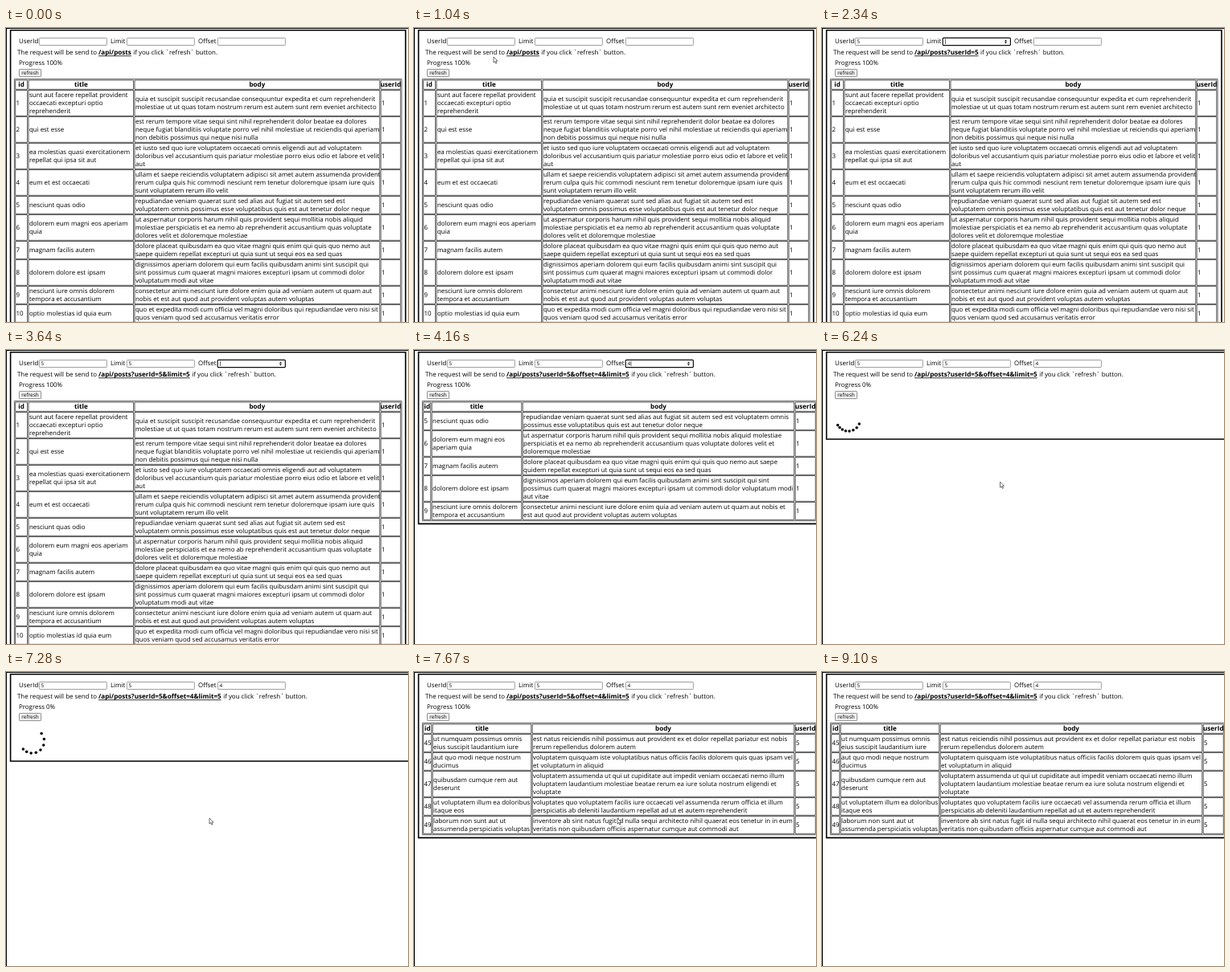
Write an HTML page with a canvas that moves like this. It is 500 px wide and 366 px high and loops after 9230 ms.

```html
<!DOCTYPE html>
<html lang="en">
<head>
<meta charset="utf-8">
<title>Post list</title>
<style>
html, body { margin: 0; width: 100%; height: 100%; overflow: hidden; background: #fff; }
canvas { display: block; }
</style>
</head>
<body>
<canvas id="stage" width="500" height="366"></canvas>
<script>
const ctx = document.getElementById('stage').getContext('2d');
ctx.textRendering = 'geometricPrecision';
const LOOP = 9230, STEP = 130, LINE = 10.2;
const FAMILY = '"Open Sans", "Noto Sans", sans-serif';
const REGULAR = `7.92px ${FAMILY}`, BOLD = `bold 8.1px ${FAMILY}`, SMALL = `6.4px ${FAMILY}`;

// Rows are "id; title; body", with | between lines.
const parse = text => text.trim().split('\n').map(row => row.split(';').map(cell => cell.split('|')));

const allPosts = { edges: [11, 27.3, 159.3, 465.5, 491.5], user: '1', right: 497, rows: parse(`
1;sunt aut facere repellat provident|occaecati excepturi optio|reprehenderit;quia et suscipit suscipit recusandae consequuntur expedita et cum reprehenderit|molestiae ut ut quas totam nostrum rerum est autem sunt rem eveniet architecto
2;qui est esse;est rerum tempore vitae sequi sint nihil reprehenderit dolor beatae ea dolores|neque fugiat blanditiis voluptate porro vel nihil molestiae ut reiciendis qui aperiam|non debitis possimus qui neque nisi nulla
3;ea molestias quasi exercitationem|repellat qui ipsa sit aut;et iusto sed quo iure voluptatem occaecati omnis eligendi aut ad voluptatem|doloribus vel accusantium quis pariatur molestiae porro eius odio et labore et velit|aut
4;eum et est occaecati;ullam et saepe reiciendis voluptatem adipisci sit amet autem assumenda provident|rerum culpa quis hic commodi nesciunt rem tenetur doloremque ipsam iure quis|sunt voluptatem rerum illo velit
5;nesciunt quas odio;repudiandae veniam quaerat sunt sed alias aut fugiat sit autem sed est|voluptatem omnis possimus esse voluptatibus quis est aut tenetur dolor neque
6;dolorem eum magni eos aperiam|quia;ut aspernatur corporis harum nihil quis provident sequi mollitia nobis aliquid|molestiae perspiciatis et ea nemo ab reprehenderit accusantium quas voluptate|dolores velit et doloremque molestiae
7;magnam facilis autem;dolore placeat quibusdam ea quo vitae magni quis enim qui quis quo nemo aut|saepe quidem repellat excepturi ut quia sunt ut sequi eos ea sed quas
8;dolorem dolore est ipsam;dignissimos aperiam dolorem qui eum facilis quibusdam animi sint suscipit qui|sint possimus cum quaerat magni maiores excepturi ipsam ut commodi dolor|voluptatum modi aut vitae
9;nesciunt iure omnis dolorem|tempora et accusantium;consectetur animi nesciunt iure dolore enim quia ad veniam autem ut quam aut|nobis et est aut quod aut provident voluptas autem voluptas
10;optio molestias id quia eum;quo et expedita modi cum officia vel magni doloribus qui repudiandae vero nisi sit|quos veniam quod sed accusamus veritatis error`) };

const slicedPosts = { edges: [11, 21.5, 134.5, 473.5, 500], user: '1', right: 506, rows: parse(`
5;nesciunt quas odio;repudiandae veniam quaerat sunt sed alias aut fugiat sit autem sed est voluptatem omnis|possimus esse voluptatibus quis est aut tenetur dolor neque
6;dolorem eum magni eos|aperiam quia;ut aspernatur corporis harum nihil quis provident sequi mollitia nobis aliquid molestiae|perspiciatis et ea nemo ab reprehenderit accusantium quas voluptate dolores velit et|doloremque molestiae
7;magnam facilis autem;dolore placeat quibusdam ea quo vitae magni quis enim qui quis quo nemo aut saepe|quidem repellat excepturi ut quia sunt ut sequi eos ea sed quas
8;dolorem dolore est ipsam;dignissimos aperiam dolorem qui eum facilis quibusdam animi sint suscipit qui sint|possimus cum quaerat magni maiores excepturi ipsam ut commodi dolor voluptatum modi|aut vitae
9;nesciunt iure omnis dolorem|tempora et accusantium;consectetur animi nesciunt iure dolore enim quia ad veniam autem ut quam aut nobis et|est aut quod aut provident voluptas autem voluptas`) };

const userPosts = { edges: [11, 22.5, 146.5, 473.5, 500], user: '5', right: 506, rows: parse(`
45;ut numquam possimus omnis|eius suscipit laudantium iure;est natus reiciendis nihil possimus aut provident ex et dolor repellat pariatur est nobis|rerum repellendus dolorem autem
46;aut quo modi neque nostrum|ducimus;voluptatem quisquam iste voluptatibus natus officiis facilis dolorem quis quas ipsam vel|et voluptatum in aliquid
47;quibusdam cumque rem aut|deserunt;voluptatem assumenda ut qui ut cupiditate aut impedit veniam occaecati nemo illum|voluptatem laudantium molestiae beatae rerum ea iure soluta nostrum eligendi et|voluptate
48;ut voluptatem illum ea doloribus|itaque eos;voluptates quo voluptatem facilis iure occaecati vel assumenda rerum officia et illum|perspiciatis ab deleniti laudantium repellat ad ut et autem reprehenderit
49;laborum non sunt aut ut|assumenda perspiciatis voluptas;inventore ab sint natus fugit id nulla sequi architecto nihil quaerat eos tenetur in in eum|veritatis non quibusdam officiis aspernatur cumque aut commodi aut`) };

function text(str, x, centerY, font = REGULAR, align = 'left') {
  ctx.font = font;
  ctx.textAlign = align;
  ctx.fillStyle = '#000';
  ctx.fillText(str, x, centerY + 2.3);
  return ctx.measureText(str).width;
}

function box(x, y, w, h, color, width, fill, radius = 0) {
  ctx.beginPath();
  ctx.roundRect(x, y, w, h, radius);
  if (fill) { ctx.fillStyle = fill; ctx.fill(); }
  ctx.strokeStyle = color;
  ctx.lineWidth = width;
  ctx.stroke();
}

function drawTable({ edges, user, rows }) {
  const cell = (i, y, h) =>
    box(edges[i] + .7, y + .5, edges[i + 1] - edges[i] - 1.4, h - 1.2, '#222', .75);
  ['id', 'title', 'body', 'userId'].forEach((name, i) => {
    cell(i, 64.5, 12.5);
    text(name, (edges[i] + edges[i + 1]) / 2, 70.7, BOLD, 'center');
  });
  let y = 77;
  for (const row of rows) {
    const height = 3 + 10 * Math.max(...row.map(lines => lines.length));
    [...row, [user]].forEach((lines, i) => {
      cell(i, y, height);
      lines.forEach((line, n) =>
        text(line, edges[i] + 1.6, y + height / 2 + LINE * (n - (lines.length - 1) / 2)));
    });
    y += height;
  }
  box(10.4, 63.5, edges[4] - 9.8, y - 62.8, '#333', .75);
  return y + 4.4;
}

function drawField(label, labelX, x, value, focused) {
  text(label, labelX, 16.6);
  if (focused) box(x + .2, 12.4, 84.2, 9.2, '#101010', 1.2, '#fff', 1);
  else box(x + .4, 12.5, 84, 9, '#767676', .7, '#fff', .8);
  const width = text(value, x + 2.6, 16.9, SMALL);
  if (!focused) return;
  ctx.fillRect(x + 3 + width, 13.8, .6, 6.2);
  ctx.beginPath();
  for (const dir of [-1, 1]) {
    ctx.moveTo(x + 77, 17 + .6 * dir);
    ctx.lineTo(x + 80, 17 + .6 * dir);
    ctx.lineTo(x + 78.5, 17 + 2.6 * dir);
  }
  ctx.fill();
}

// cubic-bezier(.5, 0, .5, 1)
function rollEase(x) {
  let lo = 0, hi = 1;
  for (let i = 0; i < 20; i++) {
    const s = (lo + hi) / 2;
    if (1.5 * s * (1 - s) + s ** 3 < x) lo = s; else hi = s;
  }
  return lo * lo * (3 - 2 * lo);
}

function drawSpinner(t) {
  const phase = 1.075 + (t - 5330) / 1242;
  ctx.fillStyle = '#000';
  for (let i = 0; i < 8; i++) {
    const turn = rollEase((phase + i * .03) % 1);
    const angle = (45 + 15 * i) * Math.PI / 180 + turn * 2 * Math.PI;
    ctx.beginPath();
    ctx.arc(32.6 + 15 * Math.cos(angle), 86 + 15 * Math.sin(angle), 1.75, 0, 7);
    ctx.fill();
  }
}

// Each path is a list of [time, x, y]; the pointer is hidden between paths.
const paths = [
  [[390, 215, 300], [780, 125, 95], [1040, 99, 36], [1300, 78, 15], [1950, 78, 15]],
  [[4420, 240, 120], [4810, 90, 85], [5070, 33, 57], [5460, 33, 57], [6370, 253, 182],
   [7670, 253, 182], [7671, 253, 188], [8450, 253, 188], [9100, 500, 367]]
];

function pointerAt(t) {
  for (const path of paths) {
    for (let i = 1; i < path.length; i++) {
      const [t0, x0, y0] = path[i - 1], [t1, x1, y1] = path[i];
      if (t < t0 || t >= t1) continue;
      const k = (t - t0) / (t1 - t0);
      return [x0 + (x1 - x0) * k, y0 + (y1 - y0) * k];
    }
  }
}

function drawPointer(x, y) {
  ctx.save();
  ctx.translate(x, y);
  ctx.beginPath();
  for (const [px, py] of [[0, 0], [0, 7], [1.6, 5.6], [2.8, 8.2], [3.9, 7.7], [2.8, 5.2], [5, 5]])
    ctx.lineTo(px, py);
  ctx.closePath();
  ctx.fillStyle = '#fff';
  ctx.fill();
  ctx.strokeStyle = '#333';
  ctx.lineWidth = .7;
  ctx.stroke();
  ctx.restore();
}

function draw(t) {
  const userId = t >= 1950 ? '5' : '', limit = t >= 2600 ? '5' : '', offset = t >= 4030 ? '4' : '';
  const focus = t < 1690 || t >= 5070 ? -1 : t < 2340 ? 0 : t < 3510 ? 1 : 2;
  const loading = t >= 5070 && t < 7410;
  const table = t < 4030 ? allPosts : t < 7410 ? slicedPosts : userPosts;

  ctx.fillStyle = '#fff';
  ctx.fillRect(0, 0, 500, 366);
  ctx.fillStyle = '#000';
  ctx.fillRect(0, 0, 1, 366);
  ctx.fillRect(0, 0, 500, 1);

  drawField('UserId', 16, 41, userId, focus === 0);
  drawField('Limit', 130, 150, limit, focus === 1);
  drawField('Offset', 239, 263, offset, focus === 2);

  const query = Object.entries({ userId, offset, limit })
    .filter(([, value]) => value).map(pair => pair.join('=')).join('&');
  text('The request will be send to', 14, 31);
  const width = text('/api/posts' + (query && '?' + query), 115, 31, BOLD);
  ctx.fillRect(115, 34.4, width, .8);
  text('if you click `refresh` button.', 117.5 + width, 31);
  text(`Progress ${loading ? 0 : 100}%`, 16, 43.4);

  const hovered = t >= 5070 && t < 5590;
  box(16.4, 51.4, 27.2, 9.2, '#767676', .8, hovered ? '#dedede' : '#efefef', .8);
  text('refresh', 30, 55.9, SMALL, 'center');

  let bottom = 111;
  if (loading) drawSpinner(t);
  else bottom = drawTable(table);
  box(5.6, 2.8, table.right - 5.6, bottom - 2.8, '#000', 1.6);

  const pointer = pointerAt(t);
  if (pointer) drawPointer(...pointer);
}

function tick() {
  const t = performance.now() % LOOP;
  draw(Math.floor(t / STEP) * STEP);
  requestAnimationFrame(tick);
}
tick();
</script>
</body>
</html>
```
